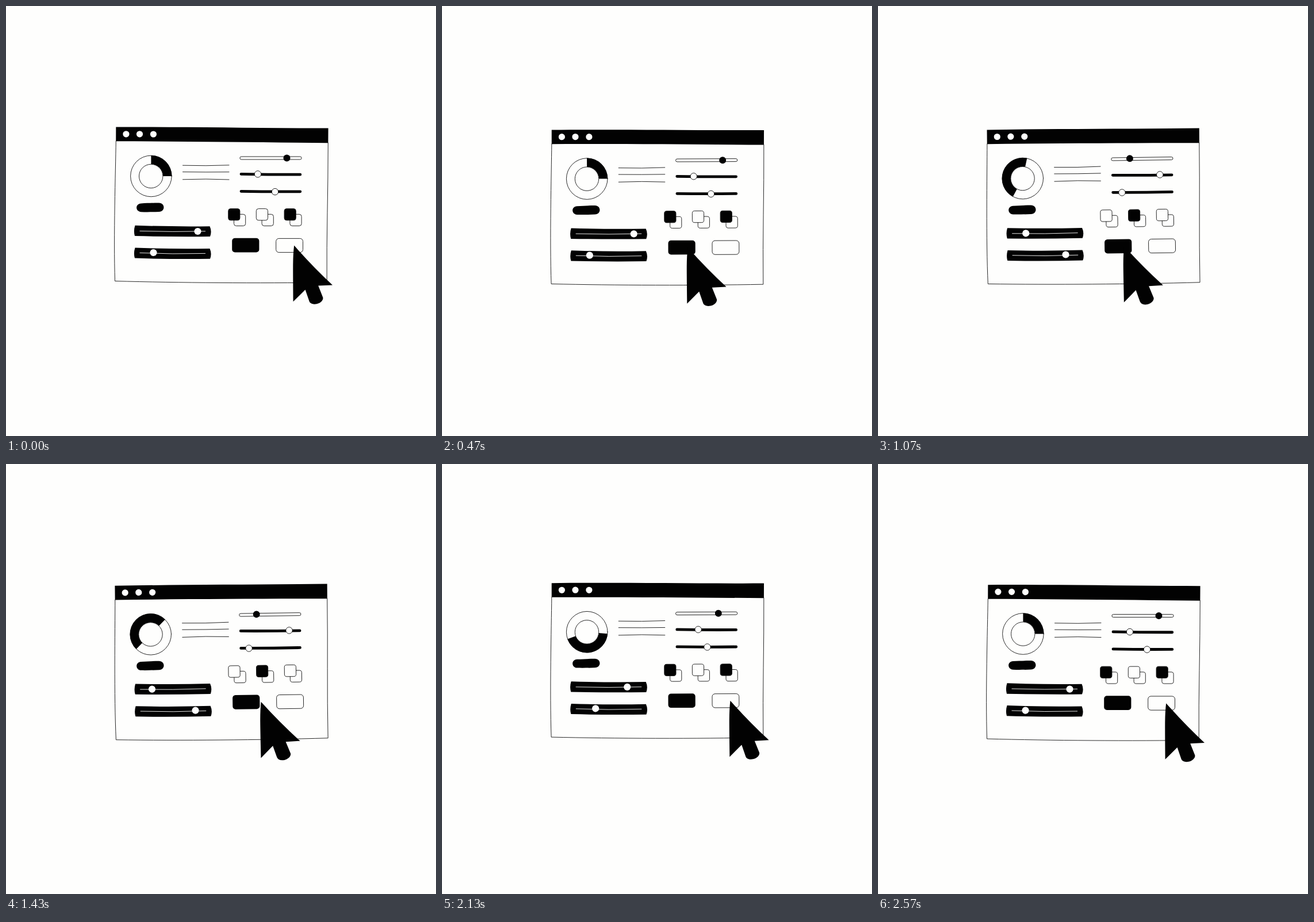
Recreate the animation shown at these times as an HTML page. Size 748 px wide and 748 px high, loop 2.61 s.

```html
<!DOCTYPE html>
<html lang="en">
<head>
<meta charset="utf-8">
<title>Settings window</title>
<style>
  html, body { margin: 0; width: 100%; height: 100%; overflow: hidden; background: #fefefd; }
  svg { display: block; width: 100vw; height: 100vh; }
  .ink { fill: #020202; }
  .paper { fill: #fefefd; }
  .line { fill: none; stroke: #111; stroke-width: 0.9; stroke-linecap: round; }
  .box { fill: #fefefd; stroke: #111; stroke-width: 0.9; }
  .faint { fill: none; stroke: #fefefd; stroke-width: 0.9; }
  .rail { fill: none; stroke: #020202; stroke-width: 4.8; stroke-linecap: round; }
</style>
</head>
<body>
<svg viewBox="0 0 748 748">
  <g id="win">
    <path class="line" d="M191.3 235C190.5 290 187 400 189.5 478.5C300 481.5 440 482.5 558.2 480.8C557.4 400 560.4 320 560.3 238"/>
    <path class="ink" d="M191.3 210.6C300 210 430 212.4 560.6 212.6L560.4 238.2C440 237 320 235.4 191.2 235.2Z"/>
    <g class="paper">
      <circle cx="208.9" cy="222.8" r="5.6"/>
      <circle cx="232.5" cy="222.8" r="5.6"/>
      <circle cx="256.4" cy="223" r="5.6"/>
    </g>

    <circle class="line" cx="252.4" cy="295.9" r="35.8"/>
    <path class="ink" id="pie"/>
    <circle class="box" cx="252.2" cy="296" r="20.7"/>
    <path class="ink" d="M235 343.4C246 343 257 342.4 266 342.5C277 342.6 277.5 357.5 266 358C256 358.3 245 358.6 235 358.2C224.5 357.5 224.5 344 235 343.4Z"/>

    <path class="line" d="M307.5 277.2Q348 278.4 388 276.8M307.5 288.6Q348 289.2 388 288.7M307.5 301.8Q348 300.2 388 302"/>

    <path class="ink" d="M224.5 381.7Q290 384 354.5 383.2Q358.5 392 355 401Q290 401.6 224 400.1Q221.5 391 224.5 381.7Z"/>
    <path class="ink" d="M224.5 420.5Q290 423 354.5 421.9Q358.5 431 355 439.8Q290 440.6 224 438.6Q221.5 430 224.5 420.5Z"/>
    <path class="faint" d="M232.5 391.4Q290 393.2 347 391.8M232.5 429.4Q290 432 347 430.4"/>

    <rect class="box" x="406.9" y="262" width="107.2" height="5" rx="2.5"/>
    <path class="rail" d="M409 292.3Q460 293.3 511.8 293.2M409 322.3Q460 323.2 511.8 322.8"/>
    <g id="knobs"></g>
    <g id="swatches"></g>

    <rect class="ink" x="393.2" y="403.8" width="47.2" height="24.6" rx="5"/>
    <rect class="box" x="469.7" y="404.4" width="46.8" height="24.2" rx="5"/>

    <path class="ink" id="cursor" d="M501.2 416.6Q535 455 568 485.4L543.2 486.6L551.3 507C552.3 511 548 516.5 540.5 518.3C533.5 519.5 529 517.5 527.5 513.5L520.6 493.4L499.6 514.3Q499.2 470 499.3 450Q499.5 430 501.2 416.6Z"/>
  </g>
</svg>
<script>
const LOOP = 2610;
const $ = id => document.getElementById(id);

function add(parent, tag, attrs) {
  const el = document.createElementNS("http://www.w3.org/2000/svg", tag);
  for (const k in attrs) el.setAttribute(k, attrs[k]);
  parent.append(el);
  return el;
}

function ease(t, start, length) {
  const p = Math.min(1, Math.max(0, (t - start) / length));
  return p * p * (3 - 2 * p);
}

// 0 -> 1 -> 0 over the loop
const swing = (t, go, goLen, back, backLen) =>
  ease(t, go, goLen) - ease(t, back, backLen);

const mix = (a, b, k) => a + (b - a) * k;

// x and y at rest, x and y after the click, radius, style
const knobs = [
  [333.5, 392, 253.3, 391.3, 6.1, "paper"],
  [256.5, 429, 328.3, 429.4, 6.1, "paper"],
  [488.5, 264.5, 436.9, 263.7, 6, "ink"],
  [438, 292.4, 493.3, 292.5, 5.7, "box"],
  [468, 323.1, 422.9, 322.7, 5.7, "box"]
].map(([x, y, x2, y2, r, style]) => ({
  x, y, x2, y2, el: add($("knobs"), "circle", { r, class: style })
}));

const swatches = [386.7, 435.3, 484.1].map(x => {
  const size = { width: 20.2, height: 20.2, rx: 4 };
  add($("swatches"), "rect", { ...size, x: x + 9.8, y: 362.3, class: "box" });
  return add($("swatches"), "rect", { ...size, x, y: 352.6, stroke: "#111", "stroke-width": 0.9 });
});

function ring(from, to) {
  const at = (deg, r) => {
    const a = deg * Math.PI / 180;
    return `${252.4 + r * Math.sin(a)} ${295.9 - r * Math.cos(a)}`;
  };
  const big = to - from > 180 ? 1 : 0;
  return `M${at(from, 36)}A36 36 0 ${big} 1 ${at(to, 36)}` +
         `L${at(to, 20.7)}A20.7 20.7 0 ${big} 0 ${at(from, 20.7)}Z`;
}

function draw(t) {
  const a = t / LOOP * 2 * Math.PI;
  $("win").setAttribute("transform",
    `translate(0 ${4.6 * Math.sin(a)}) rotate(${0.42 * (Math.cos(a) - 1)} 374 345)`);

  const move = swing(t, 100, 333, 1333, 333);
  $("cursor").setAttribute("transform", `translate(${-74 * move} ${-0.5 * move})`);

  const slide = swing(t, 632, 500, 1750, 500);
  for (const k of knobs) {
    k.el.setAttribute("cx", mix(k.x, k.x2, slide));
    k.el.setAttribute("cy", mix(k.y, k.y2, slide));
  }

  const on = t >= 667 && t < 1767;
  swatches.forEach((s, i) => s.setAttribute("fill", (i === 1) === on ? "#020202" : "#fefefd"));

  $("pie").setAttribute("d", ring(
    225 * swing(t, 652, 500, 1800, 600),
    90 + 315 * swing(t, 670, 500, 1820, 630)));
}

const begin = performance.now();
function tick() {
  draw((performance.now() - begin) % LOOP);
  requestAnimationFrame(tick);
}
tick();
</script>
</body>
</html>
```
